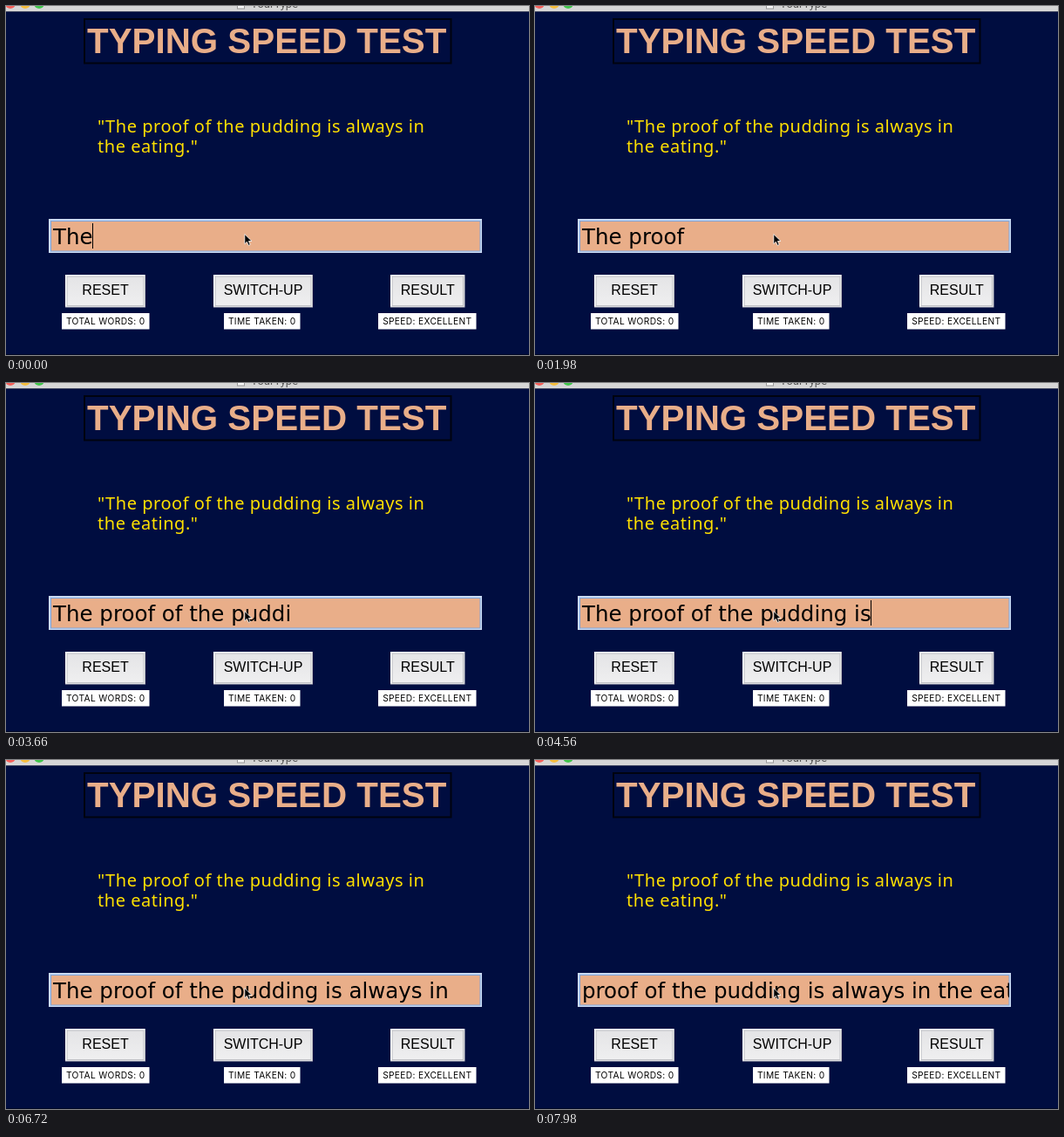
Animation of 600x400 px, one loop 8 s. Source, as an HTML page:

```html
<!DOCTYPE html>
<html lang="en">
<head>
<meta charset="utf-8">
<title>Typing speed test</title>
<style>
  html, body { margin: 0; width: 100%; height: 100%; overflow: hidden; background: #000d40; }
  svg { display: block; width: 600px; height: 400px; }
  text { white-space: pre; }
  .bar { font: 13px Roboto, sans-serif; fill: #555; }
  .title { font: bold 40.35px "Liberation Sans", Arial, sans-serif; fill: #e9ae89; }
  .quote { font: 20px "Noto Sans", "Open Sans", sans-serif; letter-spacing: .53px; fill: #ffe000; }
  .entry { font: 24.5px "DejaVu Sans", Verdana, sans-serif; fill: #000; }
  .button { font: 16px "Liberation Sans", Arial, sans-serif; text-anchor: middle; }
  .label { font: 10.2px Inter, sans-serif; letter-spacing: .35px; text-anchor: middle; }
</style>
</head>
<body>
<svg viewBox="0 0 600 400">
  <defs>
    <linearGradient id="face" x2="0" y2="1">
      <stop stop-color="#e4e4e6"/>
      <stop offset="1" stop-color="#efeff0"/>
    </linearGradient>
    <clipPath id="field"><rect x="52" y="247" width="492" height="33"/></clipPath>
  </defs>

  <rect width="600" height="400" fill="#000d40"/>
  <rect y="399" width="600" height="1" fill="#000724"/>

  <rect width="600" height="6" fill="#d6d6d6"/>
  <rect y="6" width="600" height="1" fill="#3c4460"/>
  <circle cx="5" cy="-3" r="6" fill="#f4605a"/>
  <circle cx="22" cy="-3" r="6" fill="#f6bd3b"/>
  <circle cx="38" cy="-3" r="6" fill="#3fc54a"/>
  <rect x="265.5" y="-7" width="8" height="10" fill="#f8f8f8" stroke="#999"/>
  <text class="bar" x="281" y="1.5">YourType</text>

  <rect x="90" y="15" width="420.5" height="50.5" fill="none" stroke="#00030f" stroke-width="2"/>
  <text class="title" x="93" y="54">TYPING SPEED TEST</text>

  <text class="quote" x="105" y="145">"The proof of the pudding is always in</text>
  <text class="quote" x="105" y="168">the eating."</text>

  <rect x="49" y="244" width="497" height="39" fill="#c9daf3"/>
  <rect x="51" y="246" width="493.5" height="35.5" fill="#7fa5da"/>
  <rect x="52" y="247" width="491.5" height="33.5" fill="#e9ae89"/>
  <g clip-path="url(#field)">
    <text class="entry" id="typed" x="54" y="273"></text>
    <rect id="caret" y="249" width="1" height="29"/>
  </g>

  <g id="controls"></g>

  <path d="M273.8 261.5v11.2l2.6-2.4 1.8 4.1 2-.9-1.8-4h3.6z" stroke="#fff" stroke-width=".8"/>
</svg>
<script>
const LOOP = 8000, STEP = 60, LEFT = 54, VISIBLE = 490;
const sentence = 'The proof of the pudding is always in the eating.';

// [time in ms, characters typed]
const pace = [[0, 3], [600, 3], [1950, 9], [3600, 22], [4440, 27], [5800, 34], [7380, 40], [7970, 45], [LOOP, 45]];

const typed = document.getElementById('typed');
const caret = document.getElementById('caret');
const pen = document.createElement('canvas').getContext('2d');
pen.font = '24.5px "DejaVu Sans", Verdana, sans-serif';
const width = text => pen.measureText(text).width;

function addControl(x, w, caption, labelX, labelW, label) {
  const mid = x + w / 2;
  document.getElementById('controls').insertAdjacentHTML('beforeend', `
    <rect x="${x}" y="308" width="${w}" height="37.5" fill="#b9bac1"/>
    <rect x="${x}" y="308" width="${w - 1}" height="36.5" fill="#fff"/>
    <rect x="${x + 1.5}" y="309.5" width="${w - 3}" height="34.5" fill="#c0c1c5"/>
    <rect x="${x + 2.5}" y="310.5" width="${w - 5}" height="32.5" fill="url(#face)"/>
    <text class="button" x="${mid}" y="331">${caption}</text>
    <rect x="${labelX}" y="352" width="${labelW}" height="18.5" fill="#fff"/>
    <text class="label" x="${labelX + labelW / 2}" y="364.6">${label}</text>`);
}
addControl(68, 92, 'RESET', 64, 100.5, 'TOTAL WORDS: 0');
addControl(238, 114, 'SWITCH-UP', 250, 87.5, 'TIME TAKEN: 0');
addControl(441, 85.5, 'RESULT', 427, 112.5, 'SPEED: EXCELLENT');

function countAt(time) {
  const t = Math.max(0, time);
  const i = pace.findIndex(([end]) => t < end);
  const [t0, n0] = pace[i - 1], [t1, n1] = pace[i];
  return Math.floor(n0 + (n1 - n0) * (t - t0) / (t1 - t0) + 1e-6);
}

// Whole characters leave on the left until the text fits.
function hiddenChars(count) {
  let first = 0;
  while (width(sentence.slice(first, count)) > VISIBLE) first++;
  return first;
}

function draw(now) {
  const t = Math.floor(now % LOOP / STEP) * STEP;
  const text = sentence.slice(hiddenChars(countAt(t - STEP)), countAt(t));
  typed.textContent = text;
  caret.setAttribute('x', Math.round(LEFT + width(text) - 0.4));
  caret.style.visibility = (t + 100) % 760 < 507 ? 'visible' : 'hidden';
}

let start;
function tick(now) {
  start ??= now;
  draw(now - start);
  requestAnimationFrame(tick);
}
draw(0);
requestAnimationFrame(tick);
</script>
</body>
</html>
```
